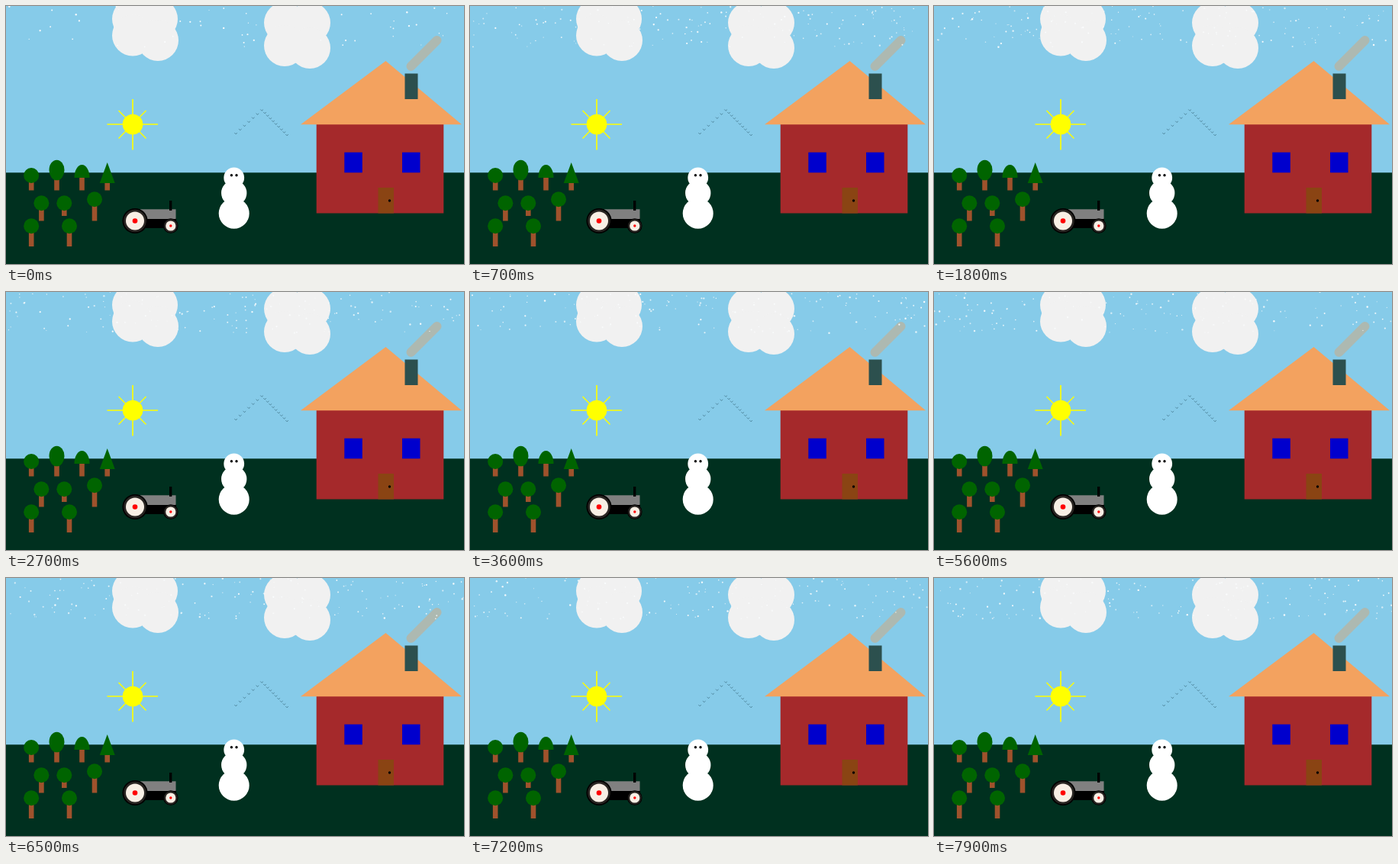
Recreate the animation shown at these times as an HTML page with a canvas. Size 600 by 338 pixels, loop 8000 ms.

```html
<!DOCTYPE html>
<html lang="en">
<head>
<meta charset="utf-8">
<title>Snow over the farm</title>
<style>
html, body { margin: 0; width: 100%; height: 100%; overflow: hidden; background: #86cbe9; }
canvas { display: block; width: 600px; height: 338px; }
</style>
</head>
<body>
<canvas id="stage" width="600" height="338"></canvas>
<script>
const LOOP = 8000, STEP = 100;
const FLAKES = 48, SNOW_DEPTH = 54;
const ctx = document.getElementById('stage').getContext('2d');
const scene = document.createElement('canvas');
scene.width = 600;
scene.height = 338;
const g = scene.getContext('2d');

function rect(x1, y1, x2, y2, color) {
  g.fillStyle = color;
  g.fillRect(x1, y1, x2 - x1, y2 - y1);
}

function oval(x, y, rx, color, ry = rx, from = 0) {
  g.fillStyle = color;
  g.beginPath();
  g.ellipse(x, y, rx, ry, 0, from, Math.PI * 2);
  g.fill();
}

function poly(points, color) {
  g.fillStyle = color;
  g.beginPath();
  points.forEach(([x, y]) => g.lineTo(x, y));
  g.fill();
}

function line(x1, y1, x2, y2, color, width = 1) {
  g.strokeStyle = color;
  g.lineWidth = width;
  g.beginPath();
  g.moveTo(x1, y1);
  g.lineTo(x2, y2);
  g.stroke();
}

function drawClouds() {
  const puffs = [
    [166, 17], [198, 17], [166, 38.5], [199, 45],
    [365, 22], [398, 22], [365, 52], [398, 55]
  ];
  puffs.forEach(([x, y]) => oval(x, y, 27, '#f1f1f1'));
}

function drawSun() {
  const yellow = '#ffff00';
  line(166, 122, 166, 188.5, yellow, 1.66);
  line(132.5, 155, 199, 155, yellow, 1.66);
  line(147.5, 137, 183.5, 173.5, yellow, 1.4);
  line(183.5, 137, 147.5, 173.5, yellow, 1.4);
  oval(166, 155, 13.3, yellow);
}

function drawBirds() {
  const flock = (x1, y1, x2, y2, n) => {
    for (let i = 0; i < n; i++) {
      const x = x1 + (x2 - x1) * i / (n - 1);
      const y = y1 + (y2 - y1) * i / (n - 1);
      g.strokeStyle = 'rgba(20, 60, 75, .75)';
      g.lineWidth = 0.6;
      g.beginPath();
      g.moveTo(x - 1.7, y - 1);
      g.lineTo(x, y + 0.8);
      g.lineTo(x + 1.9, y - 0.8);
      g.stroke();
    }
  };
  flock(301, 167, 335, 136.5, 7);
  flock(339, 140, 368, 169, 9);
}

function drawHouse() {
  rect(406.7, 155, 573.3, 271.5, '#a5292b');
  poly([[386, 155.3], [497.5, 72], [597, 155.3]], '#f3a25f');
  g.lineCap = 'round';
  line(530.5, 79, 564.5, 45, '#adb9b1', 12);
  g.lineCap = 'butt';
  rect(522.5, 88.5, 539.5, 122, '#2c504e');
  [443.3, 519].forEach(x => rect(x, 191.7, x + 23.5, 218.3, '#0000cd'));
  rect(487.5, 238, 508, 271.5, '#8a4413');
  oval(502.5, 255, 1.7, '#000');
}

function drawTree(x, y, base, kind) {
  const green = '#006400';
  rect(x - 3.3, y + 6, x + 3.3, base, '#9f522c');
  if (kind === 'tall') oval(x, y, 10, green, 13.3);
  else if (kind === 'cone') poly([[x, y - 17], [x - 10, y + 10], [x + 10, y + 10]], green);
  else if (kind === 'dome') oval(x, y + 6.5, 10, green, 17, Math.PI);
  else oval(x, y, 10, green);
}

function drawTrees() {
  drawTree(33.2, 222, 241.5);
  drawTree(66.5, 215, 241.5, 'tall');
  drawTree(99.5, 218.5, 241.5, 'dome');
  drawTree(132.7, 222, 241.5, 'cone');
  drawTree(46.4, 258.3, 281.5);
  drawTree(76.3, 258.3, 275);
  drawTree(116, 253.3, 281.5);
  drawTree(33.2, 288.3, 315);
  drawTree(83, 288.3, 315);
}

function drawWheel(x, y, r, hub, dot) {
  oval(x, y, r, '#000');
  oval(x, y, r * 0.89, '#292522');
  oval(x, y, hub, '#f8efe5');
  oval(x, y, dot, '#f00');
}

function drawTractor() {
  rect(180, 278, 223, 291, '#000');
  rect(176, 266.3, 222.5, 279, '#808080');
  rect(214, 255, 217.3, 268, '#000');
  drawWheel(169, 281.5, 16.6, 12, 3.3);
  drawWheel(215.8, 288, 9.8, 6.6, 1.7);
}

function drawSnowman() {
  oval(298.7, 225, 13.4, '#fff');
  oval(298.7, 245, 16.7, '#fff');
  oval(298.7, 271.7, 20, '#fff');
  oval(295.4, 221.8, 1.7, '#000');
  oval(302, 221.8, 1.7, '#000');
}

function drawScene() {
  rect(0, 0, 600, 338, '#86cbe9');
  rect(0, 218.3, 600, 338, '#00301f');
  drawClouds();
  drawSun();
  drawBirds();
  drawHouse();
  drawTrees();
  drawTractor();
  drawSnowman();
}

function seeded(seed) {
  let s = Math.imul(seed + 1, 2654435761);
  return () => {
    s = (s + 0x6d2b79f5) | 0;
    let v = Math.imul(s ^ (s >>> 15), 1 | s);
    v ^= v + Math.imul(v ^ (v >>> 7), 61 | v);
    return ((v ^ (v >>> 14)) >>> 0) / 4294967296;
  };
}

function drawFlurry(step, alpha) {
  const rnd = seeded(step);
  ctx.fillStyle = `rgba(250, 252, 253, ${alpha})`;
  for (let i = 0; i < FLAKES; i++) {
    ctx.beginPath();
    ctx.arc(rnd() * 600, rnd() * SNOW_DEPTH, 0.5 + rnd() * 0.75, 0, Math.PI * 2);
    ctx.fill();
  }
}

function frame(now) {
  const step = Math.floor((now % LOOP) / STEP);
  ctx.drawImage(scene, 0, 0);
  // Each flurry lingers for two more steps.
  for (let age = Math.min(2, step); age >= 0; age--) {
    drawFlurry(step - age, 0.95 - age * 0.15);
  }
  requestAnimationFrame(frame);
}

drawScene();
frame(0);
</script>
</body>
</html>
```
